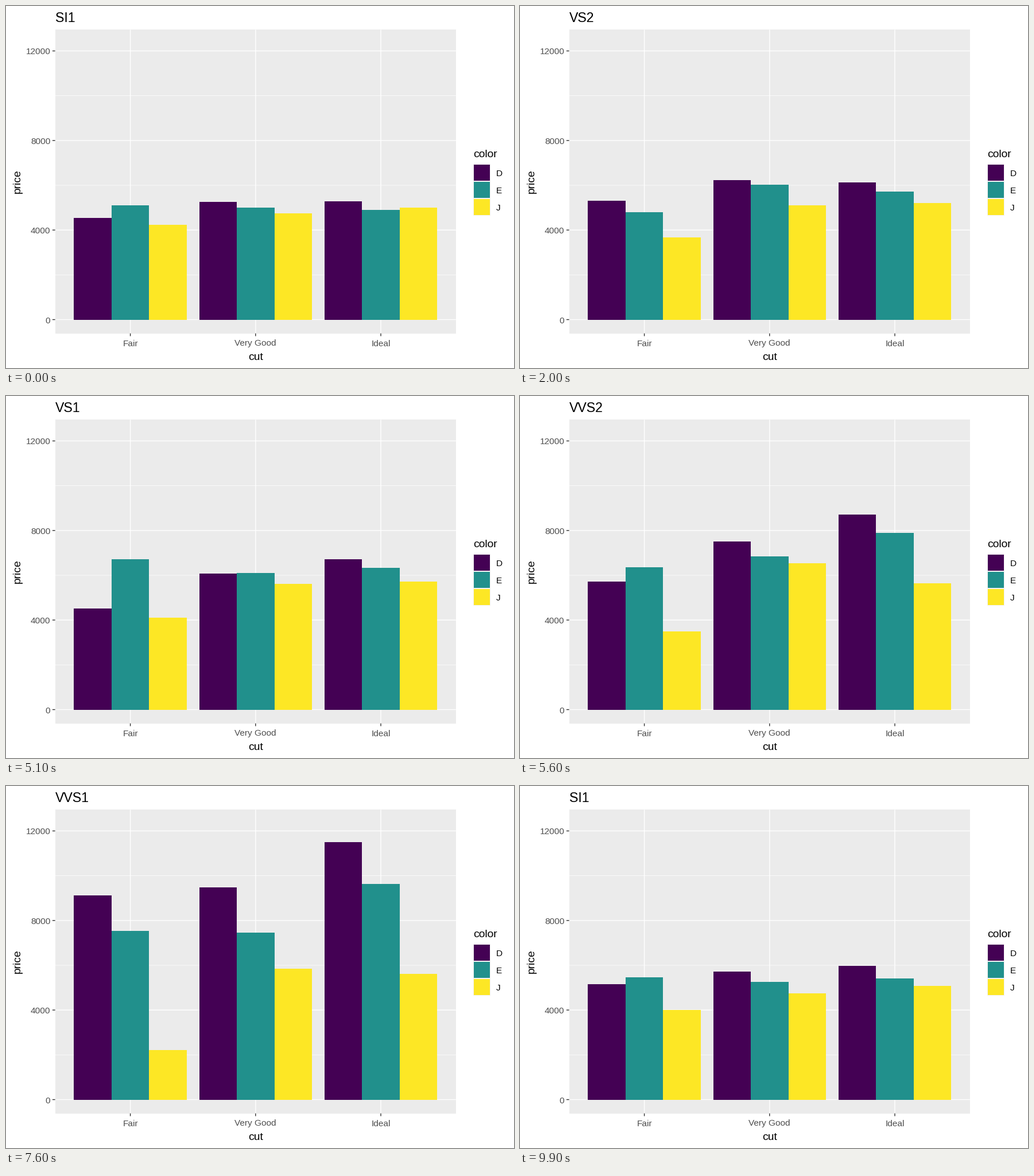
A matplotlib script for the animation above (10 s loop, 885 by 632 pixels).

```python
import numpy as np
import matplotlib.pyplot as plt
from matplotlib.animation import FuncAnimation
from matplotlib.patches import Rectangle

W, H, DPI = 885, 632, 100
PT = 72 / DPI  # points per pixel
plt.rcParams["font.family"] = "Liberation Sans"

LEFT, RIGHT, TOP, BOTTOM = 85.7, 783.9, 41.3, 571.6
BASE, STEP = 547.5, 156.35        # y of zero, pixels per 4000
MIDDLE, SPACING = 434.8, 218.2    # centre category, category distance
BAR = 0.3 * SPACING
TICK = 4.8
SMALL, MEDIUM, LARGE = 15.4, 19.25, 23.1

COLORS = {"D": "#440154", "E": "#21908C", "J": "#FDE725"}
CUTS = ["Fair", "Very Good", "Ideal"]

# Bar tops in pixels for each clarity: three colours within each cut.
TOPS = {
    "SI1": [370, 347.7, 381.5, 342.3, 352, 362.5, 341, 355.5, 352],
    "VS2": [339.7, 359.5, 403.5, 304.3, 312, 347.5, 308, 323.8, 344.3],
    "VS1": [380.1, 281.6, 382.1, 321, 314.1, 335.4, 300.9, 312.7, 322.9],
    "VVS2": [287.4, 311.4, 430.5, 209.3, 258.1, 263.6, 145.2, 189.9, 330.2],
    "VVS1": [127.2, 214.7, 481.2, 155.9, 255, 356.4, 66.2, 158.1, 326.8],
}
STATES = list(TOPS)
HOLD, MOVE = 10, 10

fig = plt.figure(figsize=(W / DPI, H / DPI), dpi=DPI, facecolor="white")
ax = fig.add_axes([0, 0, 1, 1])
ax.set_xlim(0, W)
ax.set_ylim(H, 0)
ax.axis("off")


def rect(x0, y0, x1, y1, color, z=1):
    """Hard-edged box on whole pixels."""
    x0, y0, x1, y1 = (round(v) for v in (x0, y0, x1, y1))
    return ax.add_patch(Rectangle((x0, y0), x1 - x0, y1 - y0, facecolor=color,
                                  edgecolor="none", antialiased=False, zorder=z))


def line(x, y, color, width, z=2):
    ax.plot(x, y, color=color, lw=width * PT, solid_capstyle="butt",
            snap=False, zorder=z)


def text(x, y, s, size, color="black", ha="left", **kw):
    return ax.text(x, y, s, fontsize=size * PT, color=color, ha=ha,
                   va="baseline", zorder=5, **kw)


rect(LEFT, TOP, RIGHT, BOTTOM, "#EBEBEB")

for k in range(3):
    y = BASE - (k + 0.5) * STEP
    line([LEFT, RIGHT], [y, y], "white", 0.7)

for k in range(4):
    y = BASE - k * STEP
    line([LEFT, RIGHT], [y, y], "white", 1.4)
    line([LEFT - TICK, LEFT], [y, y], "#333333", 1.4)
    text(77.3, y + 6, str(4000 * k), SMALL, "#4D4D4D", "right")

centers = [MIDDLE + (k - 1) * SPACING for k in range(3)]
for x, cut in zip(centers, CUTS):
    line([x, x], [TOP, BOTTOM], "white", 1.4)
    line([x, x], [BOTTOM, BOTTOM + TICK], "#333333", 1.4)
    text(x, 593.5, cut, SMALL, "#4D4D4D", "center")

text(MIDDLE, 618, "cut", MEDIUM, ha="center")
ax.text(25, (TOP + BOTTOM) / 2, "price", fontsize=MEDIUM * PT, rotation=90,
        rotation_mode="anchor", ha="center", va="baseline", zorder=5)
title = text(86, 28, "", LARGE)

text(814, 264, "color", MEDIUM)
KEY, INSET = 30.24, 1.24
for k, (name, color) in enumerate(COLORS.items()):
    x, y = 813.9, 275.6 + k * KEY
    rect(x, y, x + KEY, y + KEY, "#F2F2F2")
    rect(x + INSET, y + INSET, x + KEY - INSET, y + KEY - INSET, color, 3)
    text(853.7, y + KEY / 2 + 5.8, name, SMALL)

bars = []
for x in centers:
    for k, color in enumerate(COLORS.values()):
        x0 = x + (k - 1.5) * BAR
        bars.append(rect(x0, BASE, x0 + BAR, 548, color, 3))


def update(frame):
    index, step = divmod(frame, HOLD + MOVE)
    here, there = STATES[index], STATES[(index + 1) % len(STATES)]
    t = max(0, step - HOLD) / MOVE
    title.set_text(there if t >= 0.5 else here)
    tops = (1 - t) * np.array(TOPS[here]) + t * np.array(TOPS[there])
    for bar, top in zip(bars, np.round(tops)):
        bar.set_y(top)
        bar.set_height(548 - top)
    return [title, *bars]


anim = FuncAnimation(fig, update, frames=len(STATES) * (HOLD + MOVE),
                     interval=100, repeat=True, repeat_delay=0, blit=False)
plt.show()
```
